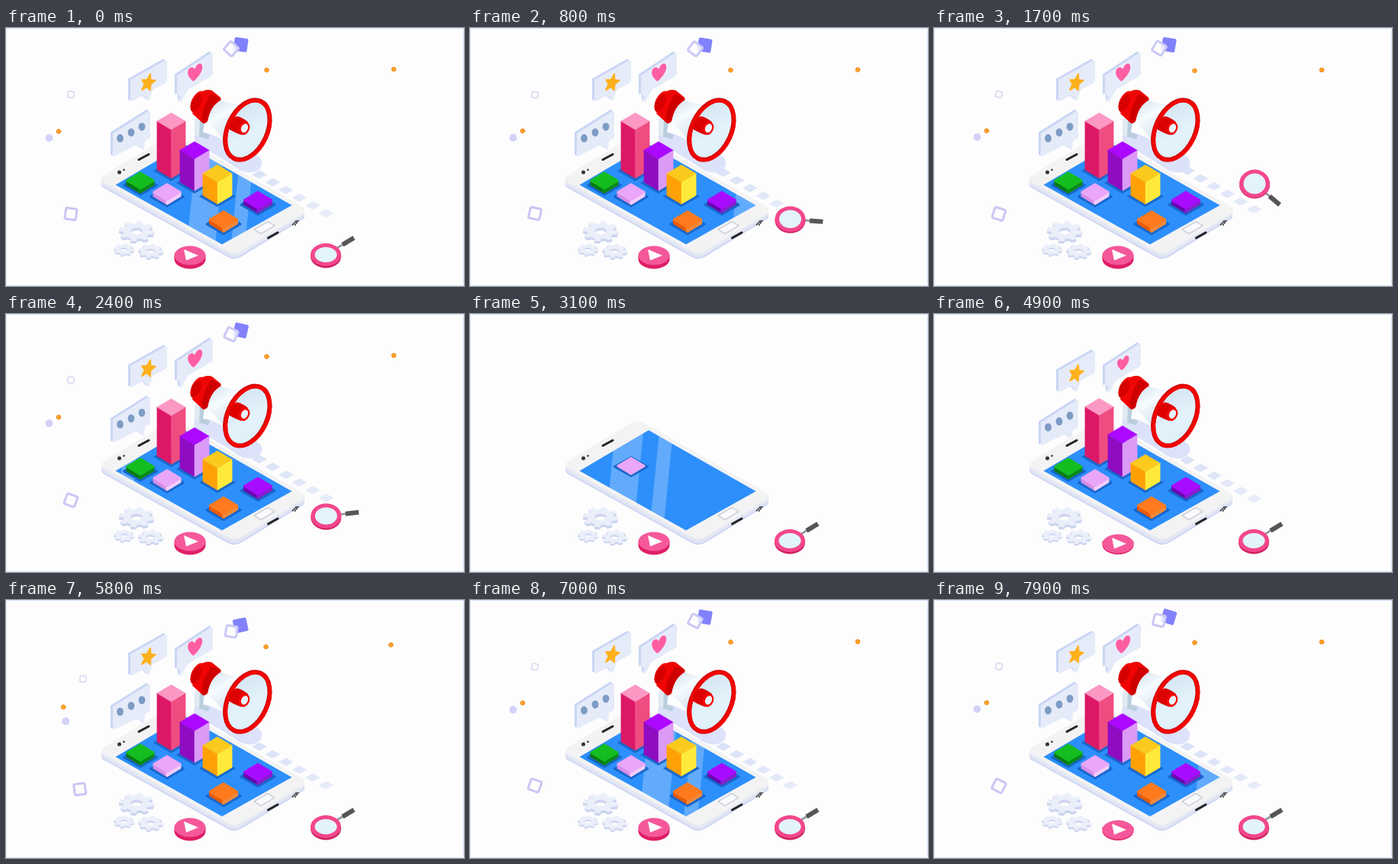
An HTML page that plays this animation: 600 by 338 pixels, repeating every 8 s.

```html
<!DOCTYPE html>
<html lang="en">
<head>
<meta charset="utf-8">
<title>Isometric phone marketing</title>
<style>
  html, body { margin: 0; width: 100%; height: 100%; overflow: hidden; background: #fdfdfd; }
  svg { display: block; width: 100vw; height: 100vh; }
</style>
</head>
<body>
<svg id="stage" viewBox="0 0 600 338" stroke-linejoin="round" stroke-linecap="round">
  <defs>
    <path id="screen" d="M143.500 205.500L234 152.300L374.500 232.200L283 283.500Z"/>
    <clipPath id="screenClip"><use href="#screen"/></clipPath>
    <path id="slab" d="M130 192L210 143Q219 138 228 143L386 232.500Q396 238.500 387 244L309 291.500Q300 297.500 291 292.500L130 203Q120 198 130 192Z"/>
    <path id="bd" d="M140 138L186 109Q189 107.500 189 111V144L182 148L181 160L171 153.500L142 168Q140 169 140 166Z"/>
    <path id="bs" d="M163 68L208 42.500Q211 41 211 44V69Q211 71 209 72L192 81.500L187 96L180 88L165 96Q163 97 163 94Z"/>
    <path id="bh" d="M224 62L268 33Q271 31 271 34V60Q271 62 269 63L238 81L229 98L227 87.500L224 88Z"/>
    <linearGradient id="cone" x1="0" y1="0" x2=".5" y2="1">
      <stop offset="0" stop-color="#c9dcea"/>
      <stop offset=".35" stop-color="#f6fbfe"/>
      <stop offset="1" stop-color="#b9d0e2"/>
    </linearGradient>
    <linearGradient id="bell" x1="0" y1="0" x2="1" y2="1">
      <stop offset="0" stop-color="#cfe2ef"/>
      <stop offset=".6" stop-color="#e4f3fb"/>
      <stop offset="1" stop-color="#d9ecf6"/>
    </linearGradient>
  </defs>

  <rect width="600" height="338" fill="#fdfdfd"/>
  <rect x=".5" y=".5" width="599" height="337" fill="none" stroke="#d6e2fa"/>

  <g id="floaters"></g>
  <g id="steps"></g>

  <g id="bubbleDots">
    <use href="#bd" x="-3" y="-1.500" fill="#c9d5f5"/>
    <use href="#bd" fill="#e6ebf9"/>
    <g id="dots" fill="#7d9cc5"></g>
  </g>
  <g id="bubbleStar">
    <use href="#bs" x="-3" y="-1.500" fill="#c9d5f5"/>
    <use href="#bs" fill="#e6ebf9"/>
    <path id="star" fill="#ffb01c" stroke="#ffb01c" stroke-width="1.500"/>
  </g>
  <g id="bubbleHeart">
    <use href="#bh" x="-3" y="-1.500" fill="#c9d5f5"/>
    <use href="#bh" fill="#e6ebf9"/>
    <path id="heart" d="M245.500 70C240 66 236.500 60 239 54.500C241 50.500 246 50.500 247.500 54C249 48 254 44 256.500 48C259.500 54 252 65 245.500 70Z" fill="#ff5ea3"/>
  </g>

  <g id="phone">
    <use href="#slab" y="7.500" fill="#c6d0f3"/>
    <use href="#slab" y="6" fill="#dfe4f3"/>
    <use href="#slab" y="3" fill="#e6e9f4"/>
    <use href="#slab" fill="#f3f3f4"/>
    <use href="#screen" fill="#2d8ffb"/>
    <g clip-path="url(#screenClip)"><path id="sheen" fill="#fff" opacity=".25"/></g>
    <path d="M174 172.500L187 165.500" stroke="#222" stroke-width="3"/>
    <circle cx="148.500" cy="189" r="2.500" fill="#333"/>
    <circle cx="154.500" cy="185.800" r="1.400" fill="#444"/>
    <path d="M325 264L343 253.500L352 259L334 269.500Z" fill="#fafafc" stroke="#cfd2dc" stroke-width="1.500"/>
    <path d="M343.500 275L356 268" stroke="#222" stroke-width="3"/>
    <path d="M375.500 257.500L381.500 251.500M378.500 258L383 252.500" stroke="#333" stroke-width="1.800" stroke-dasharray=".8 2.200"/>
  </g>

  <path id="megaShadow" d="M247 141Q254 133 268 139L326 165Q341 174 332 185Q322 193 306 186Q285 172 264 160Q243 150 247 141Z" fill="#dce2fa"/>
  <g id="blocks"></g>

  <ellipse id="ball" cx="270" cy="131" rx="10.500" ry="13" fill="#d00000"/>
  <g id="mega">
    <path d="M248 118L260 124L258 137L267 140L265 146L249 141Q247 140 247 137Z" fill="#b9cede"/>
    <path d="M248 118L254 121L253 142L249 141Q247 140 247 137Z" fill="#dfeaf3"/>
    <path d="M276 91Q300 107 332 93L296 172Q286 138 260 122Z" fill="url(#cone)"/>
    <path d="M258 82.500Q265 80 270 82L281 91Q283 95 279 96Q266 105 264 122Q261 126 257 124L244 112Z" fill="#f00505"/>
    <path d="M269 87Q276 88 281.500 93Q268 102 264 122Q261 126 257 124Q255 105 269 87Z" fill="#cf0000"/>
    <ellipse cx="252" cy="97" rx="9" ry="15.500" fill="#f00505" transform="rotate(25 252 97)"/>
    <ellipse cx="249" cy="98" rx="6" ry="12" fill="#d60000" transform="rotate(25 249 98)"/>
    <g transform="rotate(25 316.300 133.500)">
      <ellipse cx="316.300" cy="133.500" rx="25.800" ry="41.300" fill="url(#bell)" stroke="#cc0000" stroke-width="6"/>
      <ellipse cx="317" cy="133.500" rx="25.800" ry="41" fill="none" stroke="#f20505" stroke-width="4.500"/>
    </g>
    <path d="M302 115.500Q310 117 317 123L308 140Q297 136 291.500 132Q292 120 302 115.500Z" fill="#dc0202"/>
    <ellipse cx="312" cy="131.300" rx="7" ry="9" fill="#f50808" transform="rotate(25 312 131.300)"/>
    <ellipse cx="312.500" cy="131.300" rx="4.300" ry="6" fill="#e9f5fc" transform="rotate(25 312.500 131.300)"/>
  </g>

  <g id="gears"></g>

  <g id="play">
    <path d="M220.500 298V303A20.500 12.500 0 0 0 261.500 303V298Z" fill="#de1f66"/>
    <g id="playTop">
      <ellipse cx="241" cy="298" rx="20.500" ry="12.500" fill="#f5589a"/>
      <path d="M233 290L252 298L236 304.500Z" fill="#fff"/>
    </g>
  </g>

  <g id="glass">
    <g id="handle">
      <path d="M17 0H26" stroke="#8a8f98" stroke-width="2.500"/>
      <path d="M25.500 0H43" stroke="#565656" stroke-width="6" stroke-linecap="butt"/>
    </g>
    <ellipse id="rimSide" rx="20" fill="#cf1d60"/>
    <ellipse id="rim" rx="20" fill="#f3478b"/>
    <ellipse id="lens" rx="14.500" fill="#e2f3fb"/>
  </g>
</svg>

<script>
const LOOP = 8000, RESET = 2800;
const $ = id => document.getElementById(id);
const { sin, cos, PI, min, max } = Math;

function add(parent, tag, attrs) {
  const el = document.createElementNS('http://www.w3.org/2000/svg', tag);
  set(el, attrs);
  parent.appendChild(el);
  return el;
}
function set(el, attrs) {
  for (const k in attrs) el.setAttribute(k, attrs[k]);
}
const prog = (t, start, len) => min(1, max(0, (t - start) / len));
const out = p => 1 - (1 - p) ** 3;
const inOut = p => p * p * (3 - 2 * p);
const back = p => 1 + 2.2 * (p - 1) ** 3 + 1.2 * (p - 1) ** 2;
const poly = pts => 'M' + pts.map(p => p.map(v => v.toFixed(2)).join(' ')).join('L') + 'Z';
const diamond = (x, y, w, h) => poly([[x - w, y], [x, y - h], [x + w, y], [x, y + h]]);
const show = (el, on) => set(el, { visibility: on ? 'visible' : 'hidden' });

// Scales around (x, y), with an optional vertical offset.
function scale(el, x, y, s, dy = 0) {
  show(el, s > 0.01);
  set(el, { transform: `translate(${x} ${y + dy}) scale(${s}) translate(${-x} ${-y})` });
}

// Linear interpolation through [time, value] points.
function track(t, pts) {
  let i = 1;
  while (i < pts.length - 1 && t > pts[i][0]) i++;
  const [a, va] = pts[i - 1], [b, vb] = pts[i];
  return va + (vb - va) * prog(t, a, b - a);
}

// Gears
function gear(x, y, r, teeth) {
  const pts = [];
  for (let i = 0; i < teeth; i++) {
    for (const [o, k] of [[-.28, .76], [-.19, 1], [.19, 1], [.28, .76]]) {
      const a = (i + o) / teeth * 2 * PI + .2;
      pts.push([x + cos(a) * r * k, y + sin(a) * r * k * .56]);
    }
  }
  const d = poly(pts), hole = r * .36;
  const ring = `M${x - hole} ${y}a${hole} ${hole * .58} 0 1 0 ${2 * hole} 0a${hole} ${hole * .58} 0 1 0 ${-2 * hole} 0Z`;
  for (const [dy, fill] of [[3.5, '#c6cff0'], [1.8, '#d0d8f0'], [0, '#ebeffa']])
    add($('gears'), 'path', {
      d: d + ring, fill, stroke: fill, 'stroke-width': 1,
      'fill-rule': 'evenodd', transform: `translate(0 ${dy * r / 24})`
    });
}
gear(171, 266, 22.8, 8);
gear(154.5, 290, 13, 8);
gear(189.5, 292, 16, 8);

// Bars and tiles: x, base y, half width, height, start, colours of left, right and top
function block(x, y, w, h, start, left, right, top, tile) {
  const g = add($('blocks'), 'g', {});
  const part = fill => add(g, 'path', { fill, stroke: fill, 'stroke-width': tile ? 3 : .5 });
  return { x, y, w, h, start, tile, g, shade: part('#1767cb'), left: part(left), right: part(right), top: part(top) };
}
const blocks = [
  block(216.5, 186, 18.5, 64, 4450, '#dd1866', '#ef4c80', '#fb98c4'),
  block(247, 202, 19, 42, 4600, '#8e0cc2', '#dc9af7', '#ac08ff'),
  block(277, 219.5, 19, 29, 4750, '#ffa005', '#ffea3a', '#fbca1d'),
  block(176, 205, 17, 5, 3600, '#0a7a14', '#0c8a18', '#14bd20', true),
  block(211, 220, 17, 5, 2850, '#d58ce6', '#f3cdfa', '#eaa6f8', true),
  block(285, 256, 17.5, 5, 3250, '#e85a08', '#f08a3c', '#ff7a1d', true),
  block(330, 230.5, 17.5, 5, 3850, '#6a06b0', '#8420cc', '#a80cff', true)
];
function drawBlock(b, t) {
  let { x, y, w } = b, s = 1, rise;
  if (b.tile) {
    s = out(prog(t, b.start, 200));
    y -= 21 * (1 - inOut(prog(t, b.start + 260, 220)));
    rise = b.h * out(prog(t, b.start + 510, 180));
  } else {
    rise = b.h * back(prog(t, b.start, 500));
  }
  show(b.g, b.tile ? s > 0 : t > b.start);
  w *= s;
  const h = w * .595, top = y - rise;
  set(b.shade, { d: diamond(x, y + 1, w + 4.5 * s, h + 2.2 * s) });
  set(b.left, { d: poly([[x - w, top], [x, top + h], [x, y + h], [x - w, y]]) });
  set(b.right, { d: poly([[x + w, top], [x, top + h], [x, y + h], [x + w, y]]) });
  set(b.top, { d: diamond(x, top, w, h) });
}

// Floating shapes that fly out from below the phone
const box = (size, look) => ['rect', { x: -size / 2, y: -size / 2, width: size, height: size, rx: 2, ...look }];
const outline = (stroke, width) => ({ fill: '#fdfdfd', stroke, 'stroke-width': width });
const bead = ['circle', { r: 2.8, fill: '#ffa42b', stroke: '#ee8a1e', 'stroke-width': 1 }];
const spinSmall = [[0, 8], [1700, 18], [2800, 10], [5800, 4], [7000, 15], [8000, 20]];
const spinBig = [[0, 8], [1700, 18], [2800, 22], [4800, -60], [5800, -8], [7000, 20], [8000, 28]];
const spinTop = [[0, 42], [1700, 32], [2800, 20], [4800, -20], [5800, 8], [7000, 28], [8000, 12]];
const spinFill = [[0, 8], [1700, 10], [2800, 14], [4800, -60], [5800, -12], [7000, 10], [8000, 18]];
const floaters = [
  [85, 87, 209, box(8, outline('#dcdff3', 2)), spinSmall],
  [56.5, 143.5, 245, ['circle', { r: 5, fill: '#d3d2f9' }]],
  [69, 135, 50, bead],
  [85, 243.5, 155, box(14.5, outline('#c9c6f5', 3)), spinBig],
  [341.5, 55.5, 25, bead],
  [508, 54.5, 0, bead],
  [307.5, 22, 106, box(18, { fill: '#8181fb' }), spinFill],
  [295, 27, 140, box(14.5, { ...outline('#cbc9f6', 3), 'fill-opacity': .85 }), spinTop]
].map(([x, y, delay, [tag, look], spin]) => ({ x, y, delay, spin, el: add($('floaters'), tag, look) }));

function drawFloater(f, i, b, t) {
  const p = prog(b, 4826 + f.delay, 1320), left = (1 - p) ** 3;
  const x = f.x + (300 - f.x) * left;
  const y = f.y + (315 - f.y) * left + .5 * sin(t / 500 + i);
  show(f.el, p > 0);
  set(f.el, { transform: `translate(${x} ${y}) rotate(${f.spin ? track(t, f.spin) : 0}) scale(${min(1, p * 4)})` });
}

// Stepping squares, typing dots and star
const steps = [...Array(6).keys()].map(i => add($('steps'), 'path', {
  d: diamond(332 + 17.5 * i, 187 + 10.1 * i, 9, 5), fill: '#dbe3f7', stroke: '#dbe3f7'
}));
const dots = [[149.5, 144.5], [164, 136.8], [178, 129.3]].map(([x, y]) => ({
  x, y, el: add($('dots'), 'ellipse', { cx: x, cy: y, rx: 4.4, ry: 5.4 })
}));
$('star').setAttribute('d', poly([...Array(10).keys()].map(i => {
  const a = i * PI / 5 - 1.25, r = i % 2 ? 5.2 : 11.5;
  return [186 + r * .88 * cos(a), 72 + r * sin(a) - r * .3 * cos(a)];
})));

function drawGlass(t) {
  const up = t < RESET ? inOut(prog(t, 300, 1000)) - inOut(prog(t, 1950, 750)) : 0;
  const ry = 15 + 3.5 * up;
  set($('glass'), { transform: `translate(${419 + up} ${297 - 93 * up})` });
  set($('handle'), { transform: `rotate(${-31 + 71 * up})` });
  set($('rimSide'), { ry, cy: 2.5 - 1.5 * up });
  set($('rim'), { ry });
  set($('lens'), { ry: ry - 5 });
  return up;
}

function drawSheen(t) {
  const x = 88 + .131 * ((t + 1200) % 3557);
  const band = (l, w) => poly([[l + 5, 150], [l + w + 5, 150], [l + w - 9, 290], [l - 9, 290]]);
  set($('sheen'), { d: band(x, 37) + band(x + 58, 18) });
}

function draw(t) {
  // Everything is already built before the reset.
  const b = t < RESET ? LOOP * 2 : t;
  const lift = drawGlass(t);
  drawSheen(t);
  blocks.forEach(k => drawBlock(k, b));
  floaters.forEach((f, i) => drawFloater(f, i, b, t));

  const drop = 5 * inOut(prog(b, 4500, 500)) * (1 - lift);
  steps.forEach((el, i) => set(el, {
    opacity: prog(b, 3450 + 80 * i, 150) * (1 - .07 * i),
    transform: `translate(0 ${drop})`
  }));

  // Bubbles pop in, then drift slowly up into place.
  const sink = 1 - prog(b, 4000, 2600);
  scale($('bubbleDots'), 180, 158, out(prog(b, 3650, 350)), 6 * sink);
  dots.forEach((d, i) => scale(d.el, d.x, d.y, back(prog(b, 4080 + 120 * (2 - i), 220))));
  scale($('bubbleStar'), 186, 69, out(prog(b, 3950, 350)), 9.5 * sink);
  scale($('star'), 186, 72, back(prog(b, 4450, 350)));
  scale($('bubbleHeart'), 246, 65, out(prog(b, 4350, 400)), 9.5 * sink);
  scale($('heart'), 248, 57, back(prog(b, 4800, 350)));

  scale($('ball'), 270, 131, b < 4300 ? out(prog(b, 3950, 150)) : 0);
  const grow = prog(b, 4200, 600);
  scale($('mega'), 270, 128, grow > 0 ? .25 + .75 * back(grow) : 0);
  set($('megaShadow'), { opacity: prog(b, 4400, 500) });

  const gap = ((t - 7900 + 1500 + 9000) % 3000) - 1500;
  const press = inOut(max(0, 1 - Math.abs(gap) / 200));
  set($('playTop'), { transform: `translate(0 ${3.5 * press})` });
  set($('play'), { transform: `translate(0 ${-.5 * press})` });
}

const begin = performance.now();
function tick() {
  draw((performance.now() - begin) % LOOP);
  requestAnimationFrame(tick);
}
tick();
</script>
</body>
</html>
```
